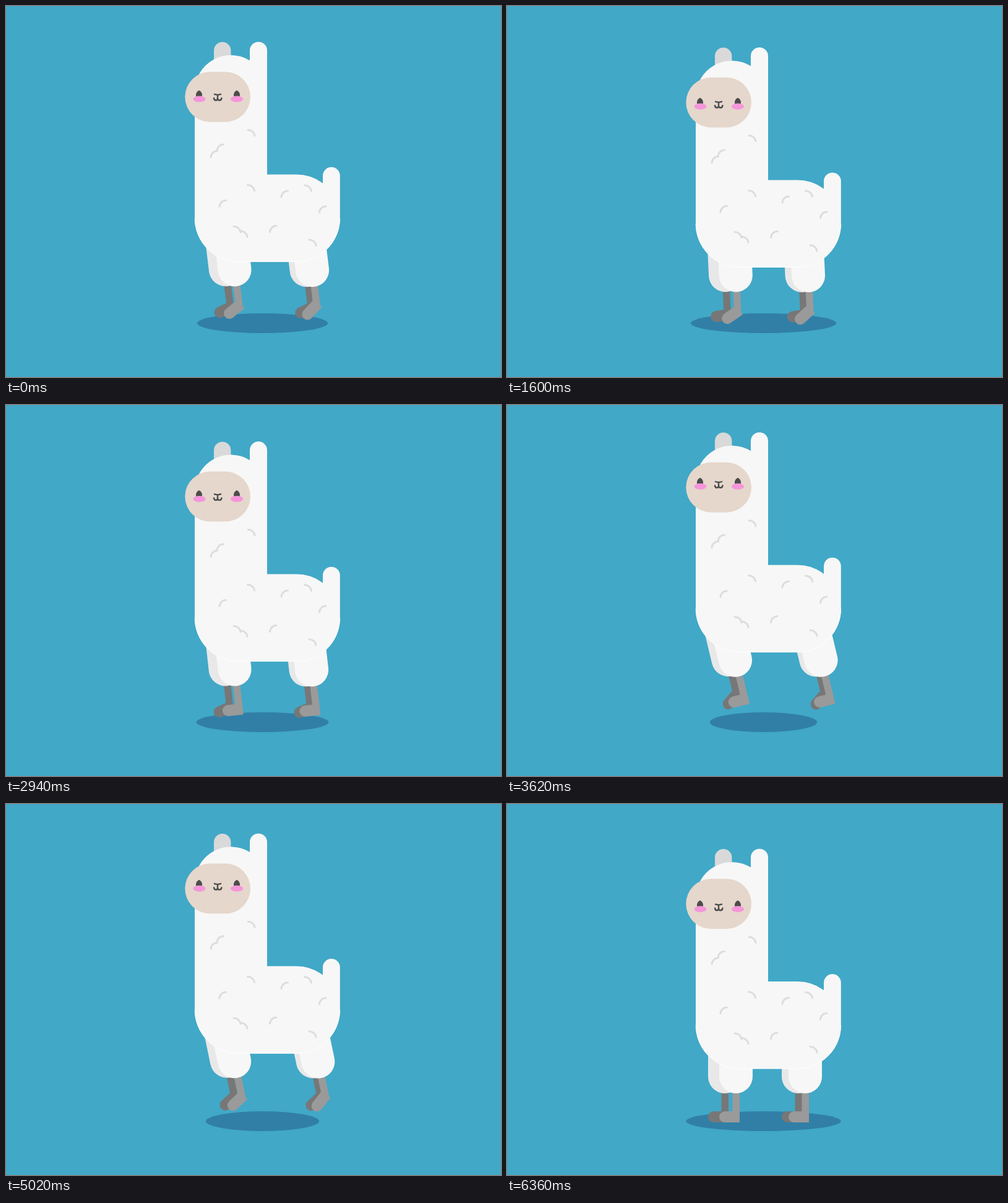
An HTML page that plays this animation: 800 by 600 pixels, repeating every 6.38 s.

```html
<!DOCTYPE html>
<html lang="en">
<head>
<meta charset="utf-8">
<title>Jumping llama</title>
<style>
  html, body { margin: 0; height: 100%; overflow: hidden; background: #41a8c7; }
  svg { display: block; width: 800px; height: 600px; }
</style>
</head>
<body>
<svg viewBox="0 0 800 600">
  <ellipse id="shadow" cx="414.5" cy="513" ry="16" fill="#317fa7"/>
  <g id="llama">
    <g id="legs"></g>
    <path fill="#d9d9d9" d="M336 110V86.5a13.7 13.7 0 0 1 27.4 0V110z"/>
    <path fill="#f7f7f7" d="M305 357.5V152.5A58.5 58.5 0 0 1 394 102.6V86.5a14 14 0 0 1 28 0V287H469.5
      A70.5 70.5 0 0 1 512 301.3V289a13.9 13.9 0 0 1 27.8 0V357.5A70.5 70.5 0 0 1 469.3 428H375.5A70.5 70.5 0 0 1 305 357.5z"/>
    <path fill="none" stroke="#fff" d="M305.2 357.5A70.5 70.5 0 0 0 375.5 428H469.3A70.5 70.5 0 0 0 539.6 357.5"/>
    <path id="curls" fill="none" stroke="#ddd" stroke-width="3" stroke-linecap="round"/>
    <rect x="289.3" y="121" width="105.7" height="81" rx="40.5" fill="#e5d7cc"/>
    <g id="face">
      <path id="eye" fill="#4c4c4c" d="M312 156C315 157 317 160.500 317 163.500C317 167 315 169 312 169S307 167 307 163.500C307 160.500 309 157 312 156z"/>
      <use href="#eye" x="61"/>
      <g fill="#f596da">
        <ellipse cx="312.5" cy="170" rx="10" ry="5"/>
        <ellipse cx="373" cy="170" rx="10" ry="5"/>
      </g>
      <path fill="none" stroke="#4c4c4c" stroke-width="2.4" stroke-linecap="round" stroke-linejoin="round"
        d="M337 162.200Q342 164.200 347 162.200M342 163.500V168M336 168.500Q336.500 172 339 172Q342 172 342 168.500Q342 172 345 172Q348 172 348.500 168.500"/>
    </g>
  </g>
</svg>
<script>
const LOOP = 6380, HOP = 810, LIFT = 31.5;
const $ = id => document.getElementById(id);

// Each leg: left edge, pivot, foot bend, near or far side.
const legs = [
  { x: 325, pivot: '352 417', bend: 40 },
  { x: 343, pivot: '370 445', bend: 32, near: true },
  { x: 444, pivot: '484 320', bend: 40 },
  { x: 455, pivot: '495 333', bend: 40, near: true }
];
$('legs').innerHTML = legs.map(({ x, near }) => `<g>
  <g fill="${near ? '#9a9a9a' : '#777'}">
    <rect x="${x + 21.5}" y="450" width="11.500" height="50"/>
    <path d="M${x + 33} 497H${x + 9}a9 9 0 0 0 0 18H${x + 33}z"/>
  </g>
  <path fill="${near ? '#f7f7f7' : '#e8e8e8'}" d="M${x} 385V441a27 27 0 0 0 54 0V385z"/>
</g>`).join('');
legs.forEach((leg, i) => {
  leg.node = $('legs').children[i];
  leg.foot = leg.node.querySelector('path');
});

const rising = [[331, 259], [341, 248.5], [345, 339], [445, 323.5], [506.5, 348.5], [426.5, 380]];
const falling = [[391, 215], [390.5, 304], [482.5, 304.5], [490, 392.5], [368, 371], [379, 378.5]];
$('curls').setAttribute('d',
  rising.map(p => `M${p}a10.5 10.5 0 0 1 10.5 -10`).join('') +
  falling.map(p => `M${p}a10.8 10.5 0 0 1 11 9.3`).join(''));

const clamp = v => Math.min(1, Math.max(0, v));
const smooth = v => (v = clamp(v)) * v * (3 - 2 * v);

// cubic-bezier(.42, 0, .58, 1)
function easeInOut(x) {
  let lo = 0, hi = 1, s = 0.5;
  for (let i = 0; i < 24; i++) {
    s = (lo + hi) / 2;
    const bx = 3 * (1 - s) * s * (0.42 * (1 - s) + 0.58 * s) + s ** 3;
    if (bx < x) lo = s; else hi = s;
  }
  return s * s * (3 - 2 * s);
}

function draw(t) {
  // The second hop is slightly slower than the rest.
  const phase = (t + 192 - 78 * clamp((t - 880) / 1020)) / HOP % 1;
  const up = easeInOut(1 - Math.abs(1 - 2 * phase));
  const kick = smooth(phase / 0.13) * smooth((0.5 - phase) / 0.15);

  $('llama').setAttribute('transform', `translate(0 ${-LIFT * up})`);
  $('face').setAttribute('transform', `translate(0 ${-11 * up})`);
  $('shadow').setAttribute('rx', 125.3 - 43 * up);
  for (const { x, pivot, bend, near, node, foot } of legs) {
    node.setAttribute('transform', `rotate(${-15 * up} ${pivot})`);
    foot.setAttribute('transform', `rotate(${-bend * (near ? kick : up)} ${x + 16.5} 506)`);
  }
}

const start = performance.now();
function tick() {
  draw((performance.now() - start) % LOOP);
  requestAnimationFrame(tick);
}
tick();
</script>
</body>
</html>
```
